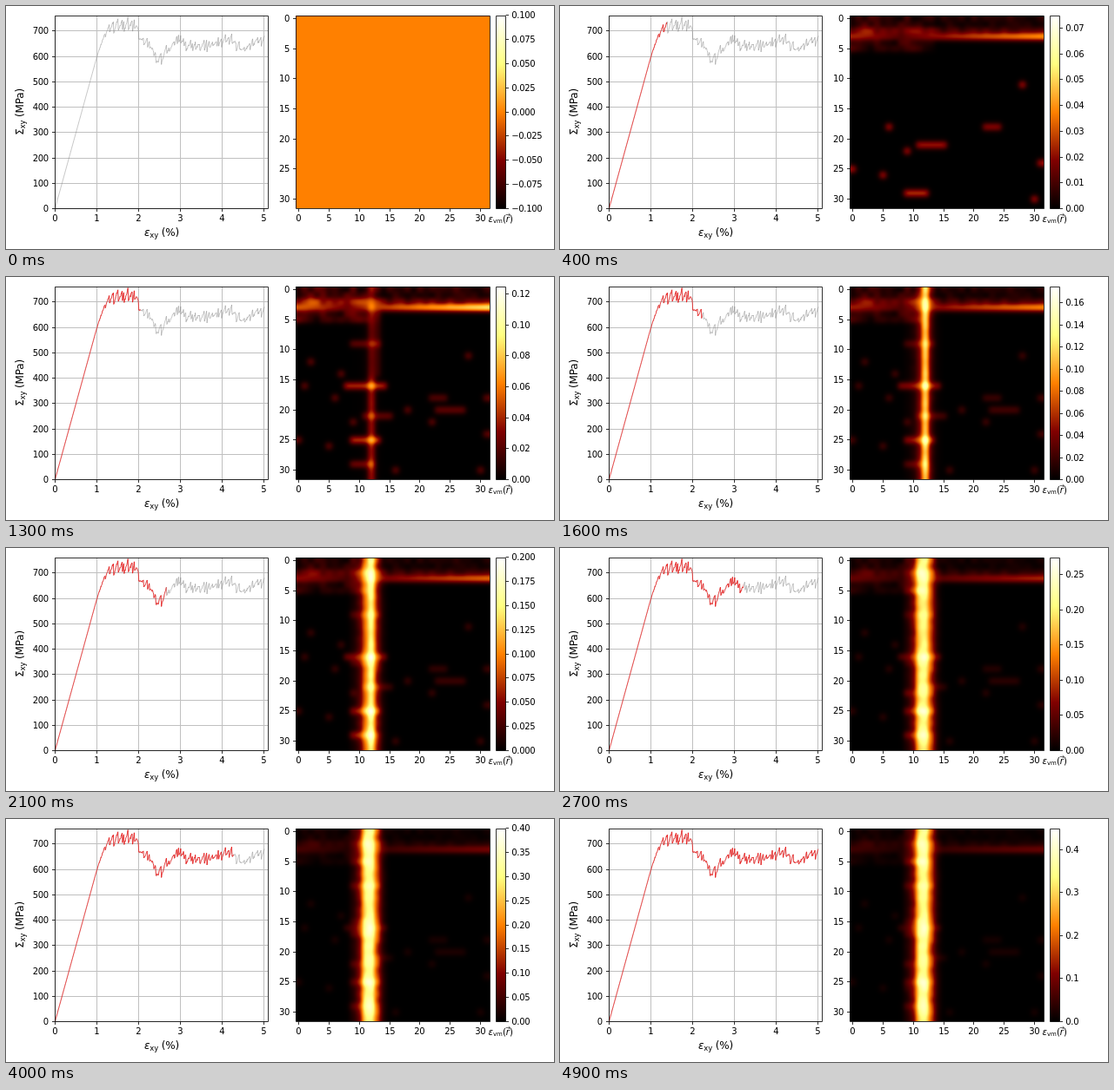
Write an HTML page with a canvas that moves like this. It is 630 px wide and 280 px high and loops after 5000 ms.

```html
<!DOCTYPE html>
<html lang="en">
<head>
<meta charset="utf-8">
<title>Shear stress and local strain</title>
<style>
  html, body { margin: 0; width: 630px; height: 280px; overflow: hidden; background: #fff; }
  canvas, svg { position: absolute; left: 0; top: 0; display: block; }
  #heat { left: 333px; top: 11px; }
  text { font: 10px "DejaVu Sans", sans-serif; letter-spacing: -.35px; }
  .axis { font-size: 12px; letter-spacing: -.15px; }
  .field { letter-spacing: 0; }
  .sub { font-size: 70%; }
  .it { font-style: oblique; }
  .line { fill: none; stroke: #000; stroke-opacity: .8; }
  .grid { fill: none; stroke: #c0c0c0; }
  .curve { fill: none; stroke-linejoin: round; }
</style>
</head>
<body>
<canvas id="heat" width="223" height="222"></canvas>
<svg width="630" height="280" viewBox="0 0 630 280">
  <defs>
    <linearGradient id="afmhot" x1="0" y1="1" x2="0" y2="0">
      <stop offset="0" stop-color="#000"/>
      <stop offset=".25" stop-color="#800000"/>
      <stop offset=".5" stop-color="#ff8000"/>
      <stop offset=".75" stop-color="#ffff80"/>
      <stop offset="1" stop-color="#fff"/>
    </linearGradient>
    <clipPath id="done"><rect id="doneBox" x="50" y="0" width="0" height="280"/></clipPath>
  </defs>
  <path id="grid" class="grid"/>
  <path id="gray" class="curve" stroke="#808080" stroke-width=".45"/>
  <path id="red" class="curve" stroke="#f00" stroke-width=".65" clip-path="url(#done)"/>
  <rect x="563.5" y="11.5" width="11" height="222" fill="url(#afmhot)"/>
  <path class="line" d="M56.5 11.5H301.5V233.5H56.5ZM333.5 11.5H556.5V233.5H333.5ZM563.5 11.5H574.5V233.5H563.5Z"/>
  <path id="ticks" class="line"/>
  <g id="labels"></g>
  <g id="scale"></g>
  <text class="axis" x="179" y="264.8" text-anchor="middle"><tspan class="it">ε</tspan><tspan class="sub" dy="2">xy</tspan><tspan dy="-2"> (%)</tspan></text>
  <text class="axis" transform="translate(19.5 121.8) rotate(-90)" text-anchor="middle">Σ<tspan class="sub" dy="2">xy</tspan><tspan dy="-2"> (MPa)</tspan></text>
  <text class="field" x="554.5" y="248.8"><tspan class="it">ε</tspan><tspan class="sub" dy="1.6">vm</tspan><tspan dy="-1.6">(</tspan><tspan class="it">r</tspan>)</text>
  <path class="line" stroke-width=".8" d="M574.5 240.6H579.5M577.8 239.1L579.5 240.6L577.8 242.1"/>
</svg>
<script>
const $ = id => document.getElementById(id);
const N = 32, STEP = 100, COUNT = 50;

function seeded(s) {
  return () => {
    s = (s * 1664525 + 1013904223) >>> 0;
    return s / 4294967296;
  };
}

const clamp = u => Math.min(1, Math.max(0, u));

// Piecewise linear curve through [x, y] points
function along(points, x) {
  let i = 1;
  while (i < points.length - 1 && x > points[i][0]) i++;
  const [x0, y0] = points[i - 1], [x1, y1] = points[i];
  return y0 + clamp((x - x0) / (x1 - x0)) * (y1 - y0);
}

const strainX = e => 56.5 + 48.1 * e;
const stressY = s => 233 - .2925 * s;

const label = (x, y, s, anchor) =>
  `<text x="${x}" y="${y + 3.6}" text-anchor="${anchor}">${s}</text>`;

function drawAxes() {
  let grid = "", ticks = "", text = "";
  for (let i = 0; i <= 5; i++) {
    const x = Math.floor(56 + 48.1 * i) + .5;
    grid += `M${x} 11V233`;
    ticks += `M${x} 233.5v3.5`;
    text += label(x - .3, 244, i, "middle");
  }
  for (let s = 0; s <= 700; s += 100) {
    const y = Math.round(stressY(s)) + .5;
    grid += `M56 ${y}H301`;
    ticks += `M56.5 ${y}h-3.5`;
    text += label(48.7, y, s, "end");
  }
  for (let i = 0; i <= 30; i += 5) {
    const x = Math.floor(333 + (i + .5) * 6.97) + .5;
    const y = Math.floor(11 + (i + .5) * 6.94) + .5;
    ticks += `M${x} 233.5v3.5M333.5 ${y}h-3.5`;
    text += label(x - .2, 244, i, "middle") + label(326, y, i, "end");
  }
  $("grid").setAttribute("d", grid);
  $("ticks").setAttribute("d", ticks);
  $("labels").innerHTML = text;
}

// Mean stress in MPa over strain in percent
const meanStress = [
  [0, 0], [1, 598], [1.2, 695], [1.35, 718], [1.95, 722], [2, 672], [2.27, 640], [2.47, 580],
  [2.93, 668], [3.2, 638], [3.7, 642], [4.18, 667], [4.5, 622], [4.75, 655], [5, 665]
];

// Slow loading and sudden drops ride on the mean stress
function drawCurve() {
  const rnd = seeded(23);
  let d = `M${strainX(0)} ${stressY(0)}`;
  let start = 1.2, length = .1, height = 40;
  for (let e = .01; e <= 5; e += .01) {
    let s = along(meanStress, e);
    if (e > 1) s += (rnd() - .5) * 9;
    if (e > start + length) {
      start += length;
      length = .04 + .1 * rnd();
      height = 15 + 45 * rnd();
    }
    if (e > start) s += height * ((e - start) / length - .5);
    d += `L${strainX(e).toFixed(2)} ${stressY(s).toFixed(2)}`;
  }
  $("gray").setAttribute("d", d);
  $("red").setAttribute("d", d);
}

// Strain reached, and the largest local strain, over the steps
const reached = [[1, 1.16], [12, 1.98], [18, 2.35], [24, 2.97], [49, 5]];
const peak = [[1, .035], [12, .099], [16, .158], [24, .224], [35, .322], [40, .385], [49, .429]];

const rnd = seeded(5);
const rough = Array.from({ length: N * N }, rnd);
const slip = (row, from, to, strain, start = 1 + 7 * rnd()) => ({ row, from, to, strain, start });

const slips = [
  slip(16, 8, 14, .048), slip(25, 9, 13, .05), slip(29, 9, 12, .03),
  slip(21, 11, 15, .026), slip(20, 23, 27, .026), slip(18, 22, 24, .022)
];
for (let i = 0; i < 14; i++) {
  const col = Math.floor(rnd() * N);
  slips.push(slip(9 + Math.floor(rnd() * 22), col, col, .026));
}
for (let i = 0; i < 10; i++) {
  slips.push(slip(4 + Math.floor(rnd() * 27), 9, 13, .025, 13 + 3.5 * i));
}

// The early damage near the top edge
function topStrain(r, c) {
  const q = rough[r * N + c], left = c < 14;
  if (r === 3) return .025 + .08 * (Math.abs(c - 8) / 23) ** .8;
  if (r === 2) return left ? .025 + .035 * q : .012 + .02 * q;
  if (left) return .03 * q;
  return r < 2 ? .02 * q : 0;
}

// Share of the shear band in columns 9 to 14
const shares = [.07, .24, .92, 1, .45, .06];

function strainField(n) {
  const f = new Float32Array(N * N);
  const early = clamp(n / 9), opened = clamp((n - 12) / 3.5), spread = clamp((n - 12) / 15);
  const core = .87 * along(peak, n) * opened;
  for (let r = 0; r < N; r++) {
    const row = r * N;
    if (r < 6) for (let c = 0; c < N; c++) f[row + c] = early * topStrain(r, c);
    if (r > 3) f[row + (r < 15 ? 13 : 12)] += .02 * clamp((n - 6) / 3) * (1 - opened);
    shares.forEach((share, i) => {
      const c = 9 + i;
      const wobble = (rough[row + c] - .5) * (share > .5 ? .16 : .5);
      f[row + c] += core * share * (share < 1 ? spread : 1) * (1 + wobble);
    });
  }
  for (const s of slips) {
    if (n < s.start) continue;
    for (let c = s.from; c <= s.to; c++) f[s.row * N + c] += s.strain;
  }
  return f;
}

// Gaussian weights for each pixel along one side
function taps(size) {
  return Array.from({ length: size }, (_, p) => {
    const u = (p + .5) * N / size - .5, base = Math.floor(u);
    const list = [];
    let sum = 0;
    for (let i = base - 1; i <= base + 2; i++) {
      const w = Math.exp(-2 * (u - i) ** 2);
      list.push([Math.min(N - 1, Math.max(0, i)), w]);
      sum += w;
    }
    list.forEach(t => t[1] /= sum);
    return list;
  });
}

const canvas = $("heat"), ctx = canvas.getContext("2d");
const W = canvas.width, H = canvas.height;
const image = ctx.createImageData(W, H);
const tapsX = taps(W), tapsY = taps(H);

function drawHeat(n, lo, hi) {
  const f = n ? strainField(n) : new Float32Array(N * N);
  const wide = new Float32Array(N * W);
  for (let r = 0; r < N; r++) {
    for (let x = 0; x < W; x++) {
      for (const [c, w] of tapsX[x]) wide[r * W + x] += w * f[r * N + c];
    }
  }
  for (let y = 0, p = 0; y < H; y++) {
    for (let x = 0; x < W; x++, p += 4) {
      let v = 0;
      for (const [r, w] of tapsY[y]) v += w * wide[r * W + x];
      const u = 2 * (v - lo) / (hi - lo);
      image.data[p] = 255 * u;
      image.data[p + 1] = 255 * (u - .5);
      image.data[p + 2] = 255 * (u - 1);
      image.data[p + 3] = 255;
    }
  }
  ctx.putImageData(image, 0, 0);
}

function tickStep(span) {
  if (span < .09) return .01;
  if (span < .19) return .02;
  if (span < .24) return .025;
  return span < .44 ? .05 : .1;
}

function drawScale(lo, hi) {
  const step = tickStep(hi - lo);
  const digits = step === .025 ? 3 : step === .1 ? 1 : 2;
  let out = "";
  for (let i = 0; lo + i * step <= hi + 1e-6; i++) {
    const v = lo + i * step;
    const y = Math.round(233 - 223 * (v - lo) / (hi - lo)) + .5;
    const s = (v < -1e-6 ? "−" : "") + Math.abs(v).toFixed(digits);
    out += `<path class="line" d="M574.5 ${y}h3.5"/>` + label(581.3, y, s, "start");
  }
  $("scale").innerHTML = out;
}

function draw(n) {
  const hi = n ? .025 * Math.ceil(along(peak, n) / .025) : .1;
  const lo = n ? 0 : -.1;
  $("doneBox").setAttribute("width", n ? strainX(along(reached, n)) - 50 : 0);
  drawHeat(n, lo, hi);
  drawScale(lo, hi);
}

let shown = -1;
function tick() {
  const n = Math.floor(performance.now() / STEP) % COUNT;
  if (n !== shown) draw(shown = n);
  requestAnimationFrame(tick);
}

drawAxes();
drawCurve();
tick();
</script>
</body>
</html>
```
